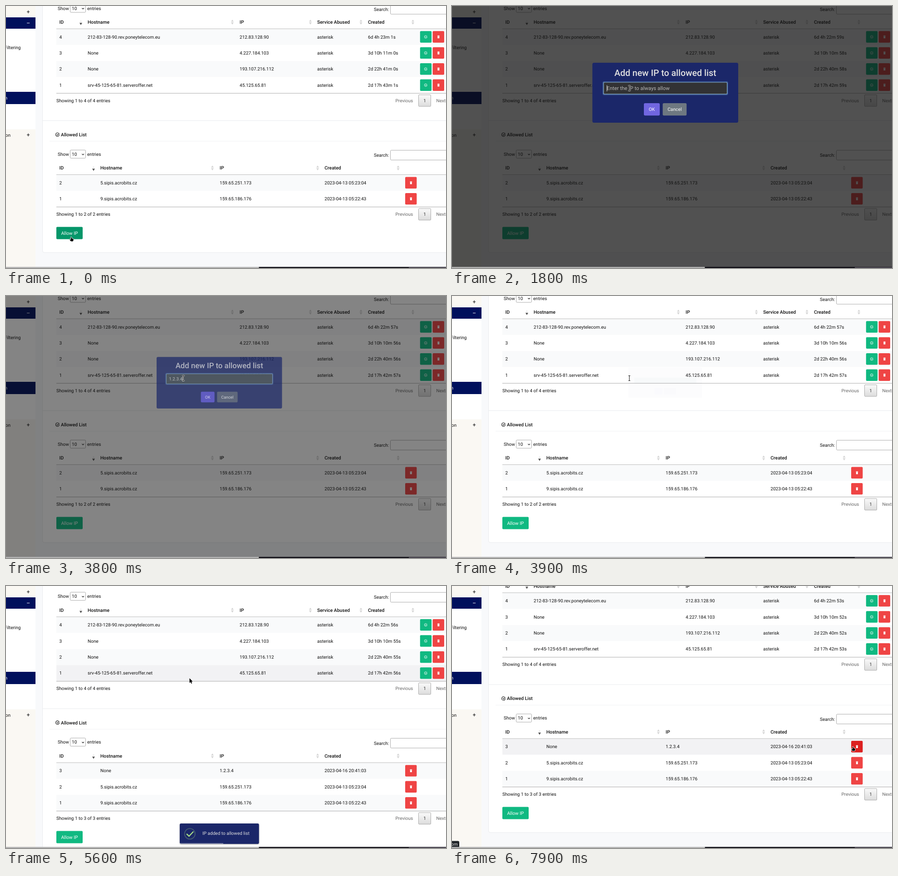
Recreate the animation shown at these times as an HTML page with a canvas. Size 970x577 px, loop 8 s.

```html
<!DOCTYPE html>
<html lang="en">
<head>
<meta charset="utf-8">
<title>IP allow list</title>
<style>
  html, body { margin: 0; height: 100%; overflow: hidden; }
  canvas { display: block; width: 970px; height: 577px; }
</style>
</head>
<body>
<canvas id="stage" width="970" height="577"></canvas>
<script>
const ctx = document.getElementById('stage').getContext('2d');
ctx.textRendering = 'geometricPrecision';

const LOOP = 8000, ROW = 35.4, NAVY = '#00105c', PANEL = '#1b2769';
const OPEN = 448, CLOSE = 3772, RELOAD = 4590, TOAST = 4700;
const GREEN = '#10b981', RED = '#ef4444';

const clamp = v => Math.max(0, Math.min(1, v));
const span = (t, from, to) => clamp((t - from) / (to - from));
const smooth = p => p * p * (3 - 2 * p);

// CSS "ease": cubic-bezier(.25, .1, .25, 1)
function ease(p) {
  let lo = 0, hi = 1;
  for (let i = 0; i < 20; i++) {
    const u = (lo + hi) / 2;
    if (0.75 * u * (1 - u) + u * u * u < p) lo = u; else hi = u;
  }
  return 0.3 * lo * (1 - lo) * (1 - lo) + 3 * lo * lo * (1 - lo) + lo * lo * lo;
}

// Keys are [time, value, value...]; each segment is eased
function track(keys, t, easing) {
  if (t <= keys[0][0]) return keys[0].slice(1);
  for (let i = 1; i < keys.length; i++) {
    const a = keys[i - 1], b = keys[i];
    if (t < b[0]) {
      const p = easing(span(t, a[0], b[0]));
      return a.slice(1).map((v, k) => v + (b[k + 1] - v) * p);
    }
  }
  return keys[keys.length - 1].slice(1);
}

function rect(x, y, w, h, color) {
  ctx.fillStyle = color;
  ctx.fillRect(x, y, w, h);
}

function box(x, y, w, h, r, fill, stroke, lineWidth = 1) {
  ctx.beginPath();
  ctx.roundRect(x, y, w, h, r);
  if (fill) { ctx.fillStyle = fill; ctx.fill(); }
  if (stroke) { ctx.strokeStyle = stroke; ctx.lineWidth = lineWidth; ctx.stroke(); }
}

function poly(points, fill, stroke, lineWidth = 1) {
  ctx.beginPath();
  points.forEach(([x, y]) => ctx.lineTo(x, y));
  if (fill) { ctx.closePath(); ctx.fillStyle = fill; ctx.fill(); }
  if (stroke) { ctx.strokeStyle = stroke; ctx.lineWidth = lineWidth; ctx.stroke(); }
}

function text(str, x, y, { size = 10.06, weight = 400, color = '#111', align = 'left' } = {}) {
  ctx.font = `${weight} ${size}px Roboto, sans-serif`;
  ctx.fillStyle = color;
  ctx.textAlign = align;
  ctx.fillText(str, x, y + size * 0.355);
}

function checkCircle(x, y, r, color) {
  ctx.beginPath();
  ctx.arc(x, y, r, -0.1, 5.4);
  ctx.strokeStyle = color;
  ctx.lineWidth = r * 0.28;
  ctx.stroke();
  poly([[x - r * .45, y - r * .1], [x, y + r * .35], [x + r, y - r * .75]], null, color, r * 0.3);
}

function trashButton(x, y, color = RED) {
  box(x, y - 12.7, 25.4, 25.4, 2, color);
  rect(x + 10.3, y - 2.8, 5, 1.1, '#fff');
  rect(x + 10.8, y - 1.4, 4, 4.6, '#fff');
  rect(x + 11.8, y - 3.3, 2, 1, '#fff');
}

function sortMark(x, y, active) {
  poly([[x - 3, y - 1], [x, y - 5.5], [x + 3, y - 1]], active ? '#eee' : '#d6d6d6');
  poly([[x - 3, y + .5], [x, y + 5.5], [x + 3, y + .5]], active ? '#555' : '#d6d6d6');
}

function duration(s) {
  return `${Math.floor(s / 86400)}d ${Math.floor(s / 3600) % 24}h ${Math.floor(s / 60) % 60}m ${s % 60}s`;
}
const seconds = (d, h, m, s) => ((d * 24 + h) * 60 + m) * 60 + s;

const BLOCKED = [
  ['4', '212-83-128-90.rev.poneytelecom.eu', '212.83.128.90', seconds(6, 4, 23, 1)],
  ['3', 'None', '4.227.184.103', seconds(3, 10, 11, 0)],
  ['2', 'None', '193.107.216.112', seconds(2, 22, 41, 0)],
  ['1', 'srv-45-125-65-81.serveroffer.net', '45.125.65.81', seconds(2, 17, 43, 1)]
];
const ALLOWED = [
  ['3', 'None', '1.2.3.4', '2023-04-16 20:41:03'],
  ['2', '5.sipis.acrobits.cz', '159.65.251.173', '2023-04-13 05:23:04'],
  ['1', '9.sipis.acrobits.cz', '159.65.186.176', '2023-04-13 05:22:43']
];
const BLOCKED_COLS = { ID: 117.5, Hostname: 180, IP: 515, 'Service Abused': 686, Created: 798 };
const ALLOWED_COLS = { ID: 117.5, Hostname: 208, IP: 471, Created: 702.3 };

// y is the centre of the header row
function table(y, title, cols, marks, rows, pointerY, drawActions) {
  checkCircle(113.5, y - 73.5, 4, '#222');
  text(title, 121, y - 73.5, { size: 10.35, weight: 500 });
  rect(96, y - 59.5, 874, 1, '#f1f2f4');

  text('Show', 114, y - 30.5);
  box(141.5, y - 39.5, 34, 18, 2, '#fff', '#aaa');
  text('10', 145, y - 30.5);
  poly([[167.5, y - 31], [169.7, y - 28.8], [171.9, y - 31]], null, '#222', 1.2);
  text('entries', 179, y - 30.5);
  text('Search:', 811, y - 28.3);
  box(847.5, y - 39, 140, 21.5, 2, '#fff', '#aaa');

  const xs = Object.values(cols);
  Object.keys(cols).forEach((name, i) => text(name, xs[i], y, { size: 10.35, weight: 500 }));
  marks.forEach((x, i) => sortMark(x, y + (i ? 0 : 1), i === 0));

  const top = y + 15;
  rows.forEach((row, i) => {
    const rowTop = top + i * ROW, mid = rowTop + ROW / 2 - .2;
    const hovered = pointerY >= rowTop && pointerY < rowTop + ROW;
    rect(111, rowTop, 859, ROW, hovered ? '#f2f2f4' : i % 2 ? '#fff' : '#f9fafb');
    row.forEach((cell, k) => text(cell, xs[k], mid));
    drawActions(mid, i);
  });
  rect(111, top - .8, 859, 1, '#bbb');

  const end = top + rows.length * ROW;
  rect(111, end - .4, 859, 1, '#aaa');
  text(`Showing 1 to ${rows.length} of ${rows.length} entries`, 111, end + 16);
  text('Previous', 858.5, end + 16, { color: '#666' });
  const shade = ctx.createLinearGradient(0, end + 3, 0, end + 29);
  shade.addColorStop(0, '#fafafa');
  shade.addColorStop(1, '#dcdcdc');
  box(909.5, end + 3.5, 27, 25.5, 1.5, shade, '#aaa');
  text('1', 923, end + 16, { align: 'center', color: '#333' });
  text('Next', 948.5, end + 16, { color: '#666' });
  return end;
}

function sidebar(t) {
  rect(0, 0, 65, 577, '#faf8f3');
  rect(0, 50, 65, 221.5, '#fff');
  rect(0, 25, 65, 25, NAVY);
  rect(0, 189, 65, 27, NAVY);
  const sign = { size: 12.5, align: 'center' };
  text('+', 49, 12.5, sign);
  text('–', 49, 38, { ...sign, color: '#fff' });
  text('+', 49, 284, sign);
  text('Packet Filtering', 32.5, 91, { align: 'right' });
  text('Protection', 3, 202, { align: 'right', color: '#fff' });
  text('Administration', 10, 284, { align: 'right' });
  if (t >= RELOAD && t < 5500) rect(63.5, 0, 1.3, 543, '#777');
}

function page(t, pointer) {
  const reloaded = t >= RELOAD;
  const scroll = reloaded ? ROW * (1 - 2 * smooth(span(t, 5480, 5850))) : 0;
  const elapsed = Math.floor((t + (reloaded ? 320 : 420)) / 1000);
  const hoverY = t >= 3980 ? pointer[1] : -1000;

  rect(0, 0, 970, 577, '#f8f9fb');
  ctx.globalAlpha = reloaded ? span(t, TOAST, 5200) : 1;
  const allowed = reloaded ? ALLOWED : ALLOWED.slice(1);
  const bottom = 543 + scroll + (reloaded ? ROW : 0);
  box(80.5, -60, 940, bottom + 60, 4, '#fff', '#e9ebee');
  rect(81, 252 + scroll, 889, 1, '#e9ebee');

  const blocked = BLOCKED.map(([id, host, ip, left]) => [id, host, ip, 'asterisk', duration(left - elapsed)]);
  table(35.5 + scroll, 'Blocked List', BLOCKED_COLS, [165, 499, 671, 782.5, 897], blocked, hoverY, y => {
    box(912.8, y - 12.7, 25.4, 25.4, 2, GREEN);
    checkCircle(925.3, y, 3, '#fff');
    trashButton(940.6, y);
  });
  const end = table(356.7 + scroll, 'Allowed List', ALLOWED_COLS, [193, 455, 687, 864.5], allowed, hoverY,
    (y, i) => trashButton(880, y, i === 0 && t >= 7080 ? '#dc2020' : RED));

  box(111, end + 44, 58, 27, 2, t < 490 ? '#059669' : GREEN);
  text('Allow IP', 140, end + 57.5, { size: 10.3, color: '#fff', align: 'center' });
  ctx.globalAlpha = 1;
  sidebar(t);
}

const TYPED_AT = [2280, 2580, 2680, 2880, 3080, 3280, 3580];

function dialog(t) {
  if (t < OPEN || t > CLOSE + 150) return;
  const dim = Math.min(span(t, OPEN, OPEN + 100), 1 - span(t, CLOSE, CLOSE + 100));
  rect(0, 0, 970, 577, `rgba(15,15,15,${0.72 * dim})`);

  const hide = ease(span(t, CLOSE, CLOSE + 150));
  const [pop] = track([[0, .7], [135, 1.05], [240, .95], [300, 1]], t - OPEN, ease);
  const scale = pop * (1 - hide / 2);
  ctx.save();
  ctx.globalAlpha = 1 - hide;
  ctx.translate(470.2, 191);
  ctx.scale(scale, scale);
  ctx.translate(-470.2, -191);
  box(309.5, 125, 321.5, 132, 3.5, PANEL);
  text('Add new IP to allowed list', 470.2, 147, { size: 19.5, weight: 500, color: '#e1e1e1', align: 'center' });

  // focus ring, border, field
  box(332, 166, 276.6, 30.2, 3.4, 'rgba(100,150,200,.5)');
  box(333.9, 167.9, 272.8, 26.4, 2, '#b4dbed');
  box(334.6, 168.6, 271.4, 25, 1.5, '#323234');
  const value = '1.2.3.4'.slice(0, TYPED_AT.filter(at => t >= at).length);
  text(value || 'Enter the IP to always allow', 341.2, 181.2, { size: 11.4, color: value ? '#e1e1e1' : '#b8b8b8' });
  if (t < 1000 || t >= 1490) {
    const caretX = 341.2 + (value ? ctx.measureText(value).width : 0);
    rect(caretX, 174.5, .9, 13.5, '#eee');
  }

  box(423, 214, 35, 27.3, 2.7, '#7066e0');
  box(464.5, 214, 52.7, 27.3, 2.7, '#6e7881');
  const label = { size: 10.3, color: '#fff', align: 'center' };
  text('OK', 440.5, 227.8, label);
  text('Cancel', 490.8, 227.8, label);
  ctx.restore();
}

function toast(t) {
  const age = t - TOAST;
  if (age < 0 || age > 2100) return;
  const hide = ease(span(age, 2000, 2100));
  const [shift, tilt] = track([[0, -7, 2], [165, 0, -2], [330, 3.5, 2], [500, 0, 0]], age, ease);
  ctx.save();
  ctx.globalAlpha = 1 - hide;
  ctx.translate(470.3, 545.5 + shift);
  ctx.rotate((tilt + hide) * Math.PI / 180);
  ctx.translate(-470.3, -545.5);
  ctx.shadowColor = 'rgba(0,0,0,.35)';
  ctx.shadowBlur = 3;
  ctx.shadowOffsetY = 1;
  box(383, 523, 174.7, 45, 3, PANEL);
  ctx.shadowColor = 'transparent';

  ctx.beginPath();
  ctx.arc(405.3, 545.8, 11.6, 0, 7);
  ctx.strokeStyle = 'rgba(165,220,134,.3)';
  ctx.lineWidth = 1.8;
  ctx.stroke();
  ctx.lineCap = 'round';
  const tip = span(age, 405, 560), long = span(age, 520, 680);
  if (tip) {
    const tick = [[398.8, 546.5], [398.8 + 4.7 * tip, 546.5 + 4.5 * tip]];
    if (long) tick.push([403.5 + 9 * long, 551 - 9.5 * long]);
    poly(tick, null, '#a5dc86', 2.5);
  } else {
    poly([[412.6, 554.6], [414, 553.2]], null, '#a5dc86', 2);
  }
  text('IP added to allowed list', 433, 544.7, { color: '#e1e1e1' });
  rect(383, 566.2, 174.7 * (1 - span(age, 0, 2000)), 1.8, 'rgba(255,255,255,.4)');
  ctx.restore();
}

function statusBubble(t) {
  const right = t >= 4390 && t < RELOAD ? 115 : t >= 7880 ? 16 : 0;
  if (!right) return;
  box(-10, 561.5, right + 10, 18, 3, '#202428');
  text(right > 16 ? 'Waiting for pbx.example.com...' : 'pbx.example.com', right - 3.5, 568.7,
    { size: 9.8, color: '#e4e4e4', align: 'right' });
}

const POINTER = [
  [680, 144, 508], [1080, 391, 165.5], [1250, 391, 165.5], [1300, 391, 172], [1480, 391, 172],
  [1780, 391, 181], [5450, 391, 181], [6150, 504, 366], [6280, 504, 366], [7150, 904, 348],
  [7220, 904, 348], [7400, 891, 350], [7840, 891, 350], [7890, 884, 353]
];
const ARROW = [[0, 0], [0, 10.5], [2.4, 8.3], [4, 12], [5.7, 11.2], [4.1, 7.7], [7.2, 7.5]];
const HAND = [[-1, 1], [.6, 1], [.8, 4], [4.8, 5], [4.6, 8], [3.6, 10.3], [-1, 10.3], [-3.8, 6.6], [-3, 5.8], [-1, 7]];

function cursor(t, [x, y]) {
  const at = shape => shape.map(([dx, dy]) => [x + dx, y + dy]);
  const outlined = shape => {
    ctx.lineJoin = 'round';
    poly([...at(shape), at(shape)[0]], '#000', '#fff', 1.6);
    poly(at(shape), '#000');
    ctx.lineJoin = 'miter';
  };
  if (t >= 1000 && t < 3980) {
    const beam = (grow, color) => {
      rect(x - .5 - grow, y - 6 - grow, 1 + 2 * grow, 12 + 2 * grow, color);
      [-6, 5].forEach(dy => rect(x - 2 - grow, y + dy - grow, 4 + 2 * grow, 1 + 2 * grow, color));
    };
    beam(.5, '#fff');
    beam(0, '#000');
  } else {
    outlined(t < 520 || t >= 7080 ? HAND : ARROW);
  }
}

function desktopEdge() {
  rect(0, 574.6, 557.5, 2.4, '#b4b4b4');
  rect(557.5, 574.6, 412.5, 2.4, '#0c0a12');
  rect(888, 575, 82, 2, '#4a4550');
}

function draw(t) {
  const pointer = track(POINTER, t, smooth);
  ctx.clearRect(0, 0, 970, 577);
  page(t, pointer);
  dialog(t);
  toast(t);
  statusBubble(t);
  cursor(t, pointer);
  desktopEdge();
}

const start = performance.now();
function frame() {
  draw((performance.now() - start) % LOOP);
  requestAnimationFrame(frame);
}
frame();
</script>
</body>
</html>
```
